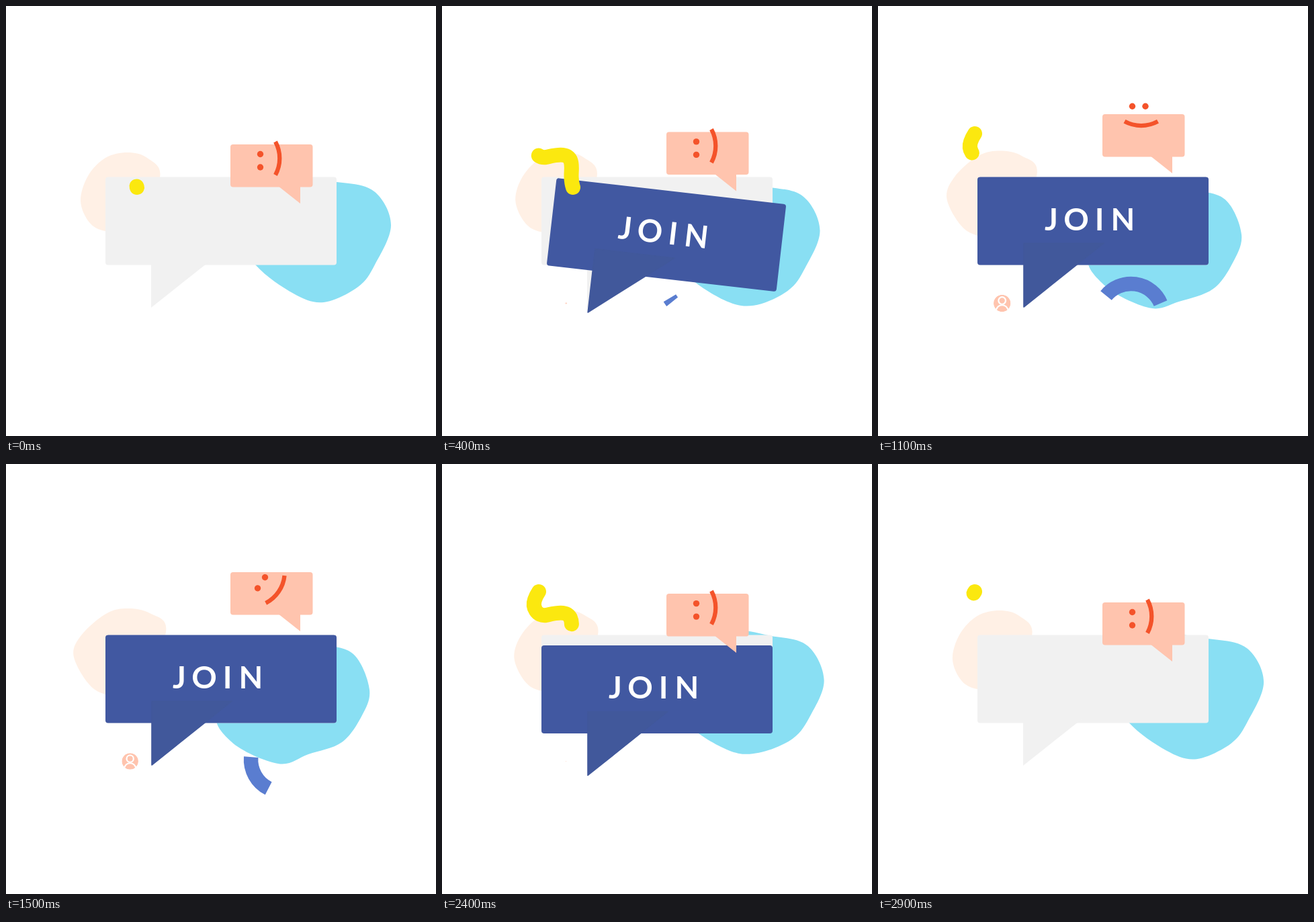
An HTML page for the animation above (3000 ms loop, 640x640 px).

```html
<!DOCTYPE html>
<html lang="en">
<head>
<meta charset="utf-8">
<title>Join</title>
<style>
  html, body { margin: 0; width: 100%; height: 100%; overflow: hidden; background: #fff; }
  svg { display: block; width: 100vw; height: 100vh; }
  text { font: 700 46.5px Lato, sans-serif; fill: #fff; text-anchor: middle; }
</style>
</head>
<body>
<svg viewBox="0 0 640 640">
  <path id="cream" fill="#fff0e5"/>
  <path id="cyan" fill="#89dff3"/>
  <path id="arc" fill="none" stroke="#5a7dd0" stroke-width="21.5"/>

  <g fill="#f1f1f1">
    <rect x="148" y="254.5" width="344" height="131" rx="4"/>
    <path d="M216 380V449L303 380Z"/>
  </g>

  <g id="join">
    <rect x="148" y="254.5" width="344" height="131" rx="4" fill="#4158a1"/>
    <path d="M217 353V448L336 353Z" fill="#41589b" stroke="#41589b" stroke-width="1.6" stroke-linejoin="round"/>
    <text x="258 295 329.7 364.5" y="333.5">JOIN</text>
  </g>

  <clipPath id="disc"><circle r="12.7"/></clipPath>
  <g id="avatar" clip-path="url(#disc)">
    <circle r="12.7" fill="#ffc4ae"/>
    <g fill="none" stroke="#fff" stroke-width="2.3">
      <path d="M-9.5 12C-7 -.5 7 -.5 9.5 12"/>
      <circle cy="-4" r="5.3" fill="#ffc4ae"/>
    </g>
  </g>

  <g id="chat">
    <g fill="#ffc4ae">
      <rect x="334" width="122.5" height="63.5" rx="4"/>
      <path d="M400 58L407 63.5L438 88V58Z"/>
    </g>
    <g id="face" fill="#f4532a">
      <circle cx="-14.5" cy="-8" r="4.7"/>
      <circle cx="-14.5" cy="11.5" r="4.7"/>
      <path d="M8 -26.5A52 52 0 0 1 8 23" fill="none" stroke="#f4532a" stroke-width="6.3"/>
    </g>
  </g>

  <path id="worm" pathLength="1" fill="none" stroke="#fbe80f" stroke-width="22" stroke-linecap="round"
    d="M195 270C189 253 196 240 191 229C185 217 165 223 155 225C141 227 134 213 138 202Q140 196 144 190"/>
</svg>
<script>
const LOOP = 3000, STEP = 100;
const set = (id, name, value) => document.getElementById(id).setAttribute(name, value);
const move = (id, value) => set(id, 'transform', value);

// Progress from 0 to 1 between two times: linear, and eased in and out
const span = (t, from, to) => Math.min(1, Math.max(0, (t - from) / (to - from)));
const ease = (t, from, to) => (1 - Math.cos(Math.PI * span(t, from, to))) / 2;

const mix = (a, b, p) => a.map((pt, i) => pt.map((v, k) => v + (b[i][k] - v) * p));

// Smooth closed curve through points
function blob(pts) {
  const n = pts.length, at = i => pts[(i + n) % n];
  let d = `M${at(0)}`;
  for (let i = 0; i < n; i++) {
    const [p, a, b, q] = [at(i - 1), at(i), at(i + 1), at(i + 2)];
    const c1 = a.map((v, k) => v + (b[k] - p[k]) / 6);
    const c2 = b.map((v, k) => v - (q[k] - a[k]) / 6);
    d += `C${c1} ${c2} ${b}`;
  }
  return d + 'Z';
}

// Each blob breathes between two outlines
const cream = [
  [[111, 290], [122, 253], [148, 226], [181, 218], [210, 226], [229, 255], [190, 335], [148, 335], [124, 322]],
  [[100.5, 285], [112, 255], [147, 224], [178, 215], [214, 222], [238, 250], [195, 350], [148, 343], [122, 326]]
];
const cyan = [
  [[548, 276], [573, 326], [549, 385], [524, 418], [473, 441], [428, 428], [372, 386], [340, 330], [410, 260], [492, 262]],
  [[520, 286], [541, 336], [530, 374], [500, 414], [450, 432], [405, 446], [335, 413], [316, 360], [400, 262], [480, 270]]
];

function drawBlobs(t) {
  const turn = 2 * Math.PI * t / LOOP;
  const swell = (1 - Math.cos(turn)) / 2, drift = Math.sin(turn);
  set('cream', 'd', blob(mix(...cream, swell)));
  set('cyan', 'd', blob(mix(...cyan, swell)));
  move('cyan', `translate(${-7 * drift} ${8.5 * drift})`);
}

function drawChat(t) {
  const rise = ease(t, 160, 700) - ease(t, 2080, 2580);
  const turn = ease(t, 420, 800) - ease(t, 1200, 1720);
  const lift = ease(t, 420, 650) - ease(t, 1200, 1500);
  const hop = Math.sin(Math.PI * span(t, 420, 800));
  move('chat', `translate(0 ${206 - 45 * rise})`);
  move('face', `translate(${393 - 3 * lift} ${22.5 - 19.7 * lift - 28 * hop}) rotate(${90 * turn})`);
}

// The bubble swings in and shrinks away around the tip of its tail
function drawJoin(t) {
  const swing = (1 - span(t, 150, 550)) ** 3;
  const drop = 152 * swing + 84 * ease(t, 2270, 2730);
  const scale = ease(t, 190, 390) - ease(t, 2400, 2750);
  move('join', `translate(217 ${449 + drop}) rotate(${124 * swing}) scale(${scale}) translate(-217 -449)`);
}

function drawAvatar(t) {
  move('avatar', `translate(184.7 442.5) scale(${ease(t, 320, 700) - ease(t, 1360, 2560)})`);
}

function drawArc(t) {
  const a = 362 - 142.5 * ease(t, 320, 850), b = 362 - 142.5 * span(t, 895, 2045);
  const s = t - 1100;
  const point = deg => {
    const r = deg * Math.PI / 180;
    return [376.5 + 48 * Math.cos(r), 461.5 + 48 * Math.sin(r)];
  };
  set('arc', 'd', b - a > .5 ? `M${point(a)}A48 48 0 0 1 ${point(b)}` : '');
  move('arc', `rotate(${-.2393 * s - .0000418 * s * s} 385.9 436.3)`);
}

function drawWorm(t) {
  const first = t < 1500;
  const head = first ? ease(t, -50, 650) : ease(t, 1630, 2330);
  const tail = first ? ease(t, 600, 1340) : ease(t, 2110, 2980);
  set('worm', 'visibility', head - tail > .001 ? 'visible' : 'hidden');
  set('worm', 'stroke-dasharray', `${Math.max(head - tail, .001)} 2`);
  set('worm', 'stroke-dashoffset', -tail);
}

const parts = [drawBlobs, drawChat, drawJoin, drawAvatar, drawArc, drawWorm];
const begin = performance.now();

function tick() {
  const t = (performance.now() - begin) % LOOP;
  for (const draw of parts) draw(Math.floor(t / STEP) * STEP);
  requestAnimationFrame(tick);
}
tick();
</script>
</body>
</html>
```
